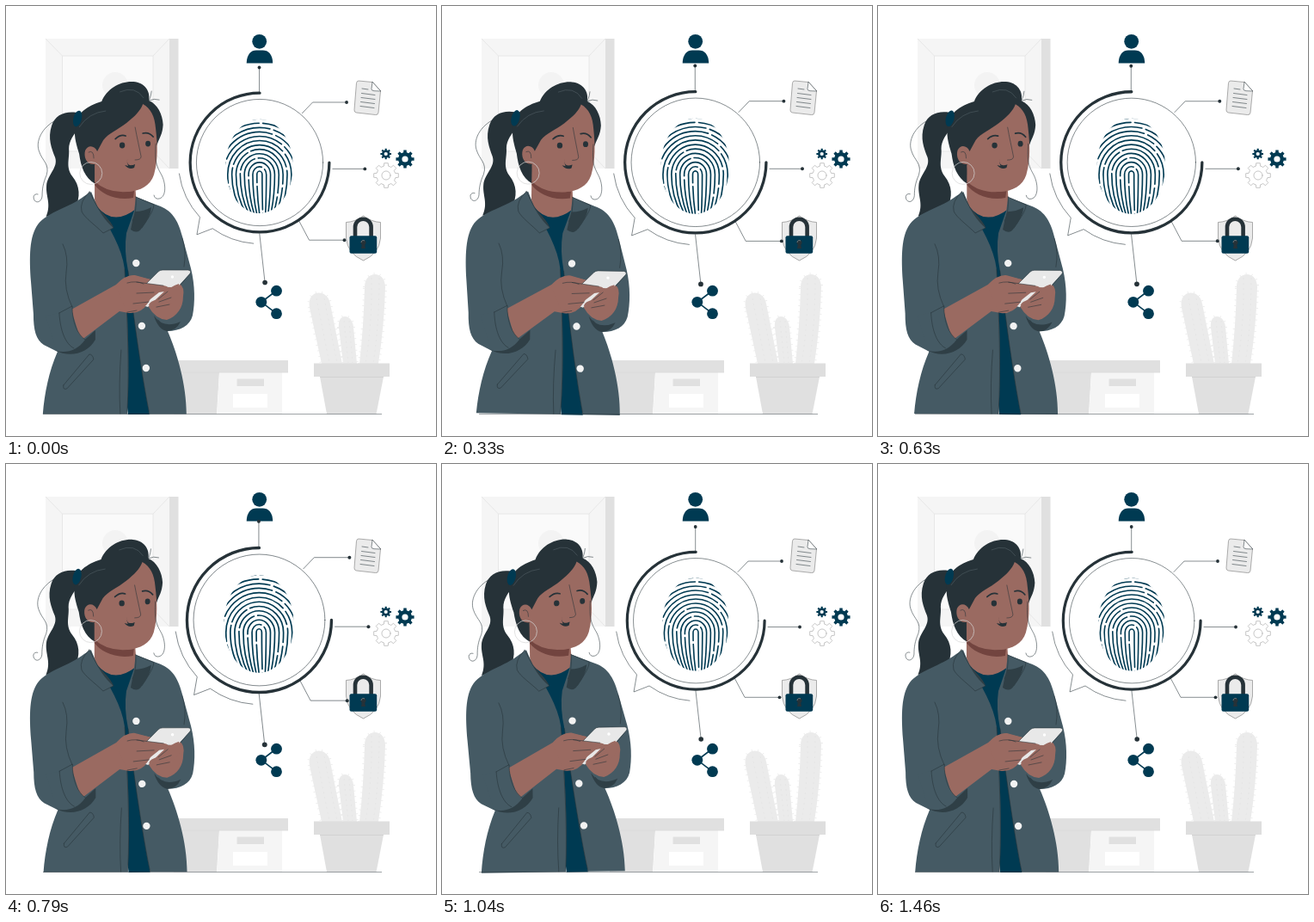
Write an HTML page that moves like this. It is 500x500 px and loops after 1.5 s.

```html
<!DOCTYPE html>
<html lang="en">
<head>
<meta charset="utf-8">
<title>Fingerprint access</title>
<style>
  html, body { margin: 0; width: 100%; height: 100%; overflow: hidden; background: #fff; }
  svg { display: block; width: 100%; height: 100%; }
  .navy { fill: #003a52; }
  .dark { fill: #263238; }
  .jacket { fill: #455a64; }
  .shade { fill: #2f3f46; }
  .skin { fill: #9a6a61; }
  .pale { fill: #ebebeb; }
  .grey { fill: #e0e0e0; }
  .line { fill: none; stroke: #263238; stroke-width: .55; stroke-linecap: round; stroke-linejoin: round; }
  .bold { stroke-width: 1.7; }
  .spines { fill: none; stroke: #e9e9e9; stroke-width: 4; stroke-dasharray: .7 6; }
  .ribs { fill: none; stroke: #e2e2e2; stroke-width: .7; stroke-dasharray: 2 4; }
</style>
</head>
<body>
<svg viewBox="0 0 500 500">
  <defs>
    <clipPath id="printEdge"><ellipse cx="294.7" cy="186.5" rx="38.7" ry="54"/></clipPath>
    <g id="cacti">
      <path d="M353 351C349 329 374 328 377 346L391 416H367Z"/>
      <path d="M387 374C385 357 402 357 404 373L408 416H392Z"/>
      <path d="M417 327C417 307 441 307 441 327Q440 370 433 416H411Q416 370 417 327Z"/>
    </g>
  </defs>

  <g id="picture">
    <path d="M46 38H190V189H46Z" fill="#f5f5f5"/>
    <path d="M190 38H200.500V189H190Z" fill="#e0e0e0"/>
    <path d="M65.500 58H171V169H65.500Z" fill="#fafafa" stroke="#e4e4e4" stroke-width=".8"/>
    <path d="M46 38L65.500 58M190 38L171 58M190 189L171 169" stroke="#e4e4e4" stroke-width=".8"/>
    <circle cx="127" cy="92" r="15" fill="#f3f3f3"/>
  </g>

  <g id="box">
    <path class="grey" d="M195 412H328V426H195Z"/>
    <path class="grey" d="M195 426H248L245 474.500H195Z"/>
    <path d="M248 426H321V474.500H245.500Z" fill="#f5f5f5"/>
    <path d="M195 426H328" stroke="#d9d9d9" stroke-width=".8"/>
    <path class="grey" d="M268.500 433.500H300V442H268.500Z"/>
    <path d="M264 451H304V467H264Z" fill="#fff"/>
  </g>

  <g id="plant">
    <use href="#cacti" class="spines"/>
    <use href="#cacti" class="pale"/>
    <path class="ribs" d="M361 340L376 415M370 340L385 415M393 366L398 415M399 366L403 415M425 316Q426 370 418 415M434 316Q434 370 427 415"/>
    <path class="grey" d="M365 431H439L430.500 474.500H373Z"/>
    <path d="M358 415.500H446V431H358Z" fill="#dedede"/>
    <path d="M365 431.500H439" stroke="#d2d2d2"/>
  </g>

  <g id="icons">
    <circle class="navy" cx="294.700" cy="41.300" r="8.400"/>
    <path class="navy" d="M279.700 66.500C280 56 285 51.500 291 51.500H298.500C305 51.500 310 56 310.200 66.500Z"/>

    <path class="pale" stroke="#777" stroke-width=".6" d="M410 87L426 88.500L435.500 99L433 124Q432.500 127 429.500 126.500L407.500 124Q404.500 123.500 405 120.500L407.500 89.500Q408 87 410 87Z"/>
    <path class="line" style="fill:#fff" d="M426 88.500L425 96.500Q425 98.500 428 98.700L435.500 99Z"/>
    <path class="line" d="M414 96L421 97M413.500 101.500L429 103.500M413 106.500L429 108.500M412.500 111.500L428.500 113.500M412 116.500L428 118.500"/>

    <g id="gears"></g>

    <path d="M415.500 244Q425 251 435.500 251.500V270Q434 288 415.500 296Q397 288 395.500 270V251.500Q406 251 415.500 244Z" class="pale" stroke="#777" stroke-width=".6"/>
    <path d="M406 269V257A9.300 9.300 0 0 1 424.600 257V269" fill="none" stroke="#263238" stroke-width="4.600"/>
    <rect class="navy" x="399.500" y="267.300" width="31.700" height="20.500" rx="2"/>
    <path class="dark" d="M414 276H417L418 282H413Z"/>
    <circle class="dark" cx="415.500" cy="275" r="3"/>
    <path d="M413 275A2.500 2.500 0 0 1 417 273" fill="none" stroke="#9aabb2" stroke-width=".6"/>

    <path d="M314.500 331L297 344.300L314.500 357.700" fill="none" stroke="#003a52" stroke-width="1.600"/>
    <g class="navy">
      <circle cx="314.500" cy="331.200" r="6.400"/><circle cx="296.800" cy="344.300" r="6.400"/><circle cx="314.500" cy="357.700" r="6.400"/>
    </g>
  </g>

  <g id="scanner">
    <circle class="line" cx="295.200" cy="182.200" r="72.700"/>
    <path d="M295.200 102.300A79.900 79.900 0 1 0 375.100 182.200" fill="none" stroke="#263238" stroke-width="3.200" stroke-linecap="round"/>
    <path class="line" d="M202.700 195A93.400 93.400 0 0 0 226.500 245L223 265L241 258A93.400 93.400 0 0 0 288 275.200"/>
    <path class="line" d="M294.700 73V101M344 125.500L356 113H395M379 189.500H416M340.500 249.500L352 271.300H392.500M295 264L301.200 320"/>
    <g class="dark">
      <circle cx="294.700" cy="73" r="1.900"/><circle cx="395" cy="113" r="1.900"/><circle cx="416" cy="189.500" r="1.900"/>
      <circle cx="392.500" cy="271.300" r="1.900"/><circle cx="301.200" cy="320" r="2.800"/>
    </g>
    <g id="print" clip-path="url(#printEdge)" fill="none" stroke="#003a52" stroke-width="1.600" stroke-linecap="round"/>
  </g>

  <g id="woman">
    <path class="line" d="M62 131C44 138 34 155 38 168C42 181 51 183 47 197C43 206 42 213 42 221C41 230 32 230 32 222Q33 218 37 219"/>
    <path class="dark" d="M82 124C68 122 57 127 53 139C48 154 53 166 57 176C61 188 48 196 47 209C46 222 53 230 46.500 245L66 239L80 236C87 222 86 209 77 198C69 187 74 178 73 166C73 157 79 149 84 143Z"/>

    <path class="dark" d="M80 143C80 125 95 116 111 111C117 96 133 87 148 88C161 89 168 99 166 110C176 114 182 126 182.500 138C182 149 178 154 176 160L160 200L104 207C91 200 87 186 85 172C82 162 79 153 80 143Z"/>
    <path class="skin" d="M103 185V225Q104 238 128 252Q146 246 152 236L150 205Z"/>
    <path d="M103 204Q120 220 149 215L148 223C128 227 110 218 103 208Z" fill="#72443f"/>
    <path class="skin" d="M159 114C168 119 173 128 174 143C176 160 177 178 172 196C168 209 156 215 142 216C124 216 108 206 104 194L103 184C93 185 90 175 92 168C95 161 103 162 106 169L113 156C119 148 130 144 140 136C150 128 156 122 159 114Z"/>
    <path class="line" d="M96 170Q102 167 102 177M150 141C152 152 155 165 157 175Q157 179 150 179"/>
    <path class="line bold" d="M127 154.500Q133 149 139 151M159 148Q166 146 171 152"/>
    <g class="dark">
      <ellipse cx="135" cy="162" rx="3.200" ry="3.400"/><ellipse cx="165" cy="160" rx="3" ry="3.400"/>
      <path d="M141 178C140 184 143 187 150 184L149 188Q143 191 138 185L142 186Q140 182 141 178Z"/>
    </g>
    <path class="line" d="M174 160C173 180 174 184 180 195C186 205 187 222 178 224Q173 225 172 220M165 111Q168 108 169 99M166 110Q172 107 178 109"/>
    <path d="M85 141Q96 124 116 122M132 100Q150 92 160 107" fill="none" stroke="#66747a" stroke-width=".4"/>
    <ellipse class="navy" cx="83" cy="131" rx="4.800" ry="9.500" transform="rotate(14 83 131)"/>
    <circle cx="98.700" cy="194.500" r="13" fill="none" stroke="#d6d6d6" stroke-width=".7"/>

    <path class="navy" d="M105 232Q124 257 151 236L160 300L167 475H142L125 300Z"/>
    <path class="jacket" d="M91 221C73 235 49 239 37 254C27 268 27 292 29 320L32 358C32 377 35 388 44 394L60 402C50 425 45 450 43 474.500H141C145 420 141 350 138 306C135 281 120 258 106 233L99 216Z"/>
    <path class="jacket" d="M151 222L177 232C192 237 200 248 205 268L215 305C220 325 220 345 217 360C214 372 202 378 188 378C199 403 210 440 210 474.500H167C158 430 149 366 142 308Q137 284 140 264L149 238Z"/>
    <path class="line" d="M138 306C141 360 144 420 141 474M142 308C149 366 158 430 167 474M205 270Q210 285 207 303M188 378L177 365"/>
    <path class="jacket line" style="fill:#455a64" d="M97 216L107 235C113 242 121 249 125 258L113 264C104 255 91 246 88 239Q85 228 97 216Z"/>
    <path class="shade" d="M98 217L107 235C113 242 121 249 125 258Q110 246 98 217Z"/>
    <path class="jacket line" style="fill:#455a64" d="M151 222L172 231C171 240 164 248 158 258L147 250Q152 240 151 222Z"/>
    <path class="shade" d="M150 239Q160 239 169 234Q168 246 158 258Q153 266 145 260Q147 248 150 239Z"/>
    <path class="line" d="M66 277Q73 291 70 310T77 350M67 441L97 405Q101 405 102 411L71 445Q66 447 67 441M134 400Q131 440 133 474"/>

    <path class="shade" d="M57 400C76 406 87 392 104 377L104 388C95 404 74 410 57 400Z"/>
    <path class="shade" d="M172 360Q183 376 203 367Q198 378 187 378Q177 376 172 360Z"/>
    <path class="skin" d="M76 353L128 324Q139 312 150 313L168 318Q164 324 159 325L174 329L165 346Q157 358 143 357L132 355L87 389Z"/>
    <path class="jacket" d="M46 360L62 357L77 349C77 367 83 382 92 388C83 401 70 404 59 401Z"/>
    <path class="line" d="M62 357L77 349C77 367 83 382 92 388M62 357C63 377 69 393 79 398"/>

    <path class="skin" d="M202 323Q208 327 206 338C206 351 199 361 187 365Q174 364 166 350L163 335L180 329Z"/>
    <path d="M160 326L177 309Q179 307 182 307H212Q216 308 214 311L202 324Q199 328 193 327Z" fill="#e8e8e8"/>
    <path class="line" d="M160 326L177 309Q179 307 182 307H212Q216 308 214 311L203 324"/>
    <path d="M159 348L178 333L184 332L165 350Z" fill="#e8e8e8"/>
    <circle cx="193.500" cy="315" r="1.700" fill="#fff"/>
    <path class="skin" d="M128 327Q140 311 151 314L168 318Q163 323 152 321L183 325Q191 326 187 330L172 333L166 344Q158 357 141 356Z"/>
    <path class="skin" d="M201 323Q191 326 188 332L177 341Q167 343 166 348Q170 352 180 349Q197 349 203 333Z"/>
    <path class="line" d="M141 322Q151 319 160 323M152 321L183 325M172 333L152 334M166 344L148 346M188 332L177 341M192 339L178 344M190 347L175 350M141 356L152 354"/>

    <g fill="#f2f2f2">
      <circle cx="151.300" cy="299" r="4.200"/><circle cx="158" cy="372" r="4.200"/><circle cx="163" cy="421" r="4.200"/>
    </g>
  </g>
  <path d="M43 474.500H437" stroke="#263238" stroke-width=".45"/>
</svg>
<script>
  const $ = id => document.getElementById(id);
  const scanner = $('scanner'), woman = $('woman');

  // Gear outline with n square teeth between radii r and R.
  function gear(x, y, r, R, n, attrs) {
    let d = '';
    for (let i = 0; i < n; i++) {
      [[-.3, r], [-.2, R], [.2, R], [.3, r]].forEach(([offset, radius]) => {
        const a = (i + offset) / n * 2 * Math.PI;
        d += (d ? 'L' : 'M') + (x + radius * Math.cos(a)) + ' ' + (y + radius * Math.sin(a));
      });
    }
    return `<g ${attrs}><path d="${d}Z"/><circle cx="${x}" cy="${y}" r="${r * .45}" fill="#fff"/></g>`;
  }
  $('gears').innerHTML =
    gear(441.7, 172, 4.7, 6.4, 8, 'class="navy"') +
    gear(464, 178, 8, 10.7, 8, 'class="navy"') +
    gear(442, 197, 11.2, 14.5, 8, 'class="line" style="stroke:#999"');

  // Nested arches with bent legs, broken by small gaps.
  let ridges = '';
  for (let i = 0; i < 13; i++) {
    const rx = 3 + 4.8 * i, ry = 4 + 5 * i, x = 295, y = 196;
    const leg = side => `${x + side * rx} 222 ${x + side * rx * .6 + 2} 243`;
    const dash = `${34 + i * 29 % 50} 4 ${60 + i * 17 % 40} 4.5`;
    ridges += `<path stroke-dasharray="${dash}" d="M${x - rx * .6 + 2} 243Q${x - rx} 222 ${x - rx} ${y}A${rx} ${ry} 0 0 1 ${x + rx} ${y}Q${leg(1)}"/>`;
  }
  $('print').innerHTML = ridges;

  // Linear interpolation through [time, value] pairs.
  function track(t, keys) {
    const i = keys.findIndex(k => k[0] > t);
    const [t0, v0] = keys[i - 1], [t1, v1] = keys[i];
    return v0 + (v1 - v0) * (t - t0) / (t1 - t0);
  }
  const PEAK = 1.088;
  const heartbeat = [[0, 1], [.1, PEAK], [.3, 1], [.4, 1], [.5, PEAK], [.6, 1], [1, 1]];
  const sway = [[0, 0], [.25, 1], [.75, -1], [1, 0]];
  const STEPS = 36, LOOP = 1500;

  function draw() {
    const step = Math.floor((performance.now() + 5) * STEPS / LOOP) % STEPS;
    const t = (step + .5) / STEPS;
    scanner.setAttribute('transform', `translate(309.7 196.5) scale(${track(t, heartbeat)}) translate(-309.7 -196.5)`);
    woman.setAttribute('transform', `rotate(${track(t, sway)} 123.5 281.5)`);
    requestAnimationFrame(draw);
  }
  draw();
</script>
</body>
</html>
```
